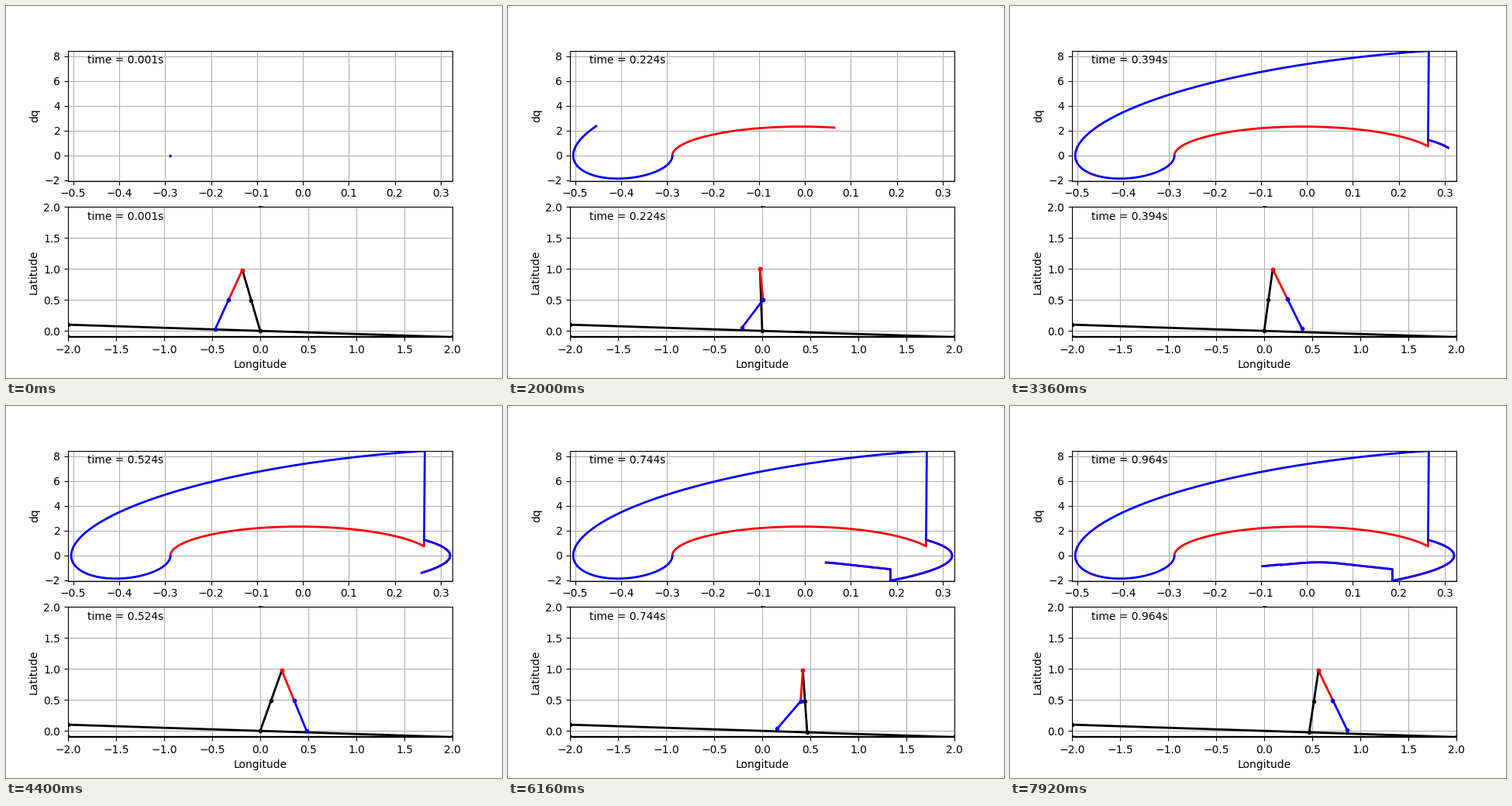
Animation, 640 px wide and 480 px high, one loop 8 s. Source, as a matplotlib script:

```python
import numpy as np
import matplotlib.pyplot as plt
from matplotlib.animation import FuncAnimation

FRAMES, INTERVAL = 100, 80
GRAVITY, SLOPE, STEP = 9.81, np.tan(0.0504), 0.00025

# Kneed passive walker: stance leg angle, swing thigh angle, swing shank angle.
# Each row places one mass: stance shank, stance thigh, hip, swing thigh, swing shank.
ARMS = np.array([[0.375, 0, 0], [0.675, 0, 0], [1, 0, 0],
                 [1, 0.325, 0], [1, 0.5, 0.125]])
MASS = np.tile([0.05, 0.5, 0.5, 0.5, 0.05], 2)
SIGN = np.array([1, -1, -1])
PULL = np.repeat([0, -GRAVITY], 5)
FREE = np.eye(3)
LOCKED = np.array([[1, 0], [0, 1], [0, 1]])


def jacobian(q):
    return np.vstack([ARMS * np.cos(q), -ARMS * SIGN * np.sin(q)])


def project(q, target, joints):
    """Mass-weighted fit of the mass motions to the allowed joint motions."""
    jac = jacobian(q) @ joints
    weighted = jac.T * MASS
    return joints @ np.linalg.solve(weighted @ jac, weighted @ target)


def derivative(state, joints):
    q, dq = state[:3], state[3:]
    bias = np.concatenate([-ARMS @ (np.sin(q) * dq**2),
                           -ARMS @ (SIGN * np.cos(q) * dq**2)])
    return np.concatenate([dq, project(q, PULL - bias, joints)])


def advance(state, joints):
    k1 = derivative(state, joints)
    k2 = derivative(state + STEP / 2 * k1, joints)
    k3 = derivative(state + STEP / 2 * k2, joints)
    k4 = derivative(state + STEP * k3, joints)
    return state + STEP / 6 * (k1 + 2 * k2 + 2 * k3 + k4)


def swing_foot(q):
    return np.array([np.sin(q[0]) + np.sin(q[1:]).mean(),
                     np.cos(q[0]) - np.cos(q[1:]).mean()])


def simulate(duration):
    state = np.array([-0.1877, -0.2884, -0.2884, 1.1014, -0.0399, -0.0399])
    origin, joints, swinging = np.zeros(2), FREE, True
    times, poses, trace = [], [], []

    def record(t):
        q, dq = state[:3], state[3:]
        times.append(t)
        poses.append((*origin, *q))
        trace.append((q[1], q[2], dq[1], dq[2]) if swinging
                     else (-q[0], -q[0], -dq[0], -dq[0]))

    record(0)
    for i in range(1, int(duration / STEP) + 1):
        state = advance(state, joints)
        q, dq = state[:3], state[3:]
        foot = swing_foot(q)
        record(i * STEP)
        if joints is FREE and q[2] >= q[1] and dq[2] > dq[1]:
            # knee strike
            joints = LOCKED
            q = np.array([q[0], q[1], q[1]])
            state = np.concatenate([q, project(q, jacobian(q) @ dq, joints)])
            record(i * STEP)
        elif joints is LOCKED and q[0] > 0 and foot[1] + SLOPE * foot[0] <= 0:
            # heel strike: the legs swap roles
            velocity = (jacobian(q) @ dq).reshape(2, 5)[:, ::-1].ravel()
            q = np.array([-q[1], -q[0], -q[0]])
            state = np.concatenate([q, project(q, velocity, LOCKED)])
            origin, joints, swinging = origin + foot, FREE, not swinging
            record(i * STEP)
    return np.array(times), np.array(poses), np.array(trace)


times, poses, trace = simulate(0.97)

fig, (phase_ax, walk_ax) = plt.subplots(2, 1, figsize=(6.4, 4.8), dpi=100)
phase_ax.set(xlim=(-0.5114, 0.3257), ylim=(-2.04, 8.46), xlabel="q", ylabel="dq")
walk_ax.set(xlim=(-2, 2), ylim=(-0.1, 2), xlabel="Longitude", ylabel="Latitude")
labels = []
for ax in (phase_ax, walk_ax):
    ax.grid()
    labels.append(ax.text(0.05, 0.9, "", transform=ax.transAxes))

thigh_trace, = phase_ax.plot([], [], "r-", lw=2)
shank_trace, = phase_ax.plot([], [], "b-", lw=2)
limb = dict(lw=2, markersize=3)
walk_ax.plot([-2, 2, -2], [0.1, -0.1, -0.1], "ko-", **limb)
stance, = walk_ax.plot([], [], "ko-", **limb)
thigh, = walk_ax.plot([], [], "ro-", **limb)
shank, = walk_ax.plot([], [], "bo-", **limb)


def draw(frame):
    t = max(0.001 * (frame + 1), 0.01 * frame - 0.026)
    end = np.searchsorted(times, t + STEP / 2)
    for label in labels:
        label.set_text(f"time = {t:.3f}s")
    thigh_trace.set_data(trace[:end, 0], trace[:end, 2])
    shank_trace.set_data(trace[:end, 1], trace[:end, 3])

    x, y, lean, upper, lower = poses[end - 1]
    foot = np.array([x, y])
    up = np.array([np.sin(lean), np.cos(lean)])
    hip = foot + up
    knee = hip + 0.5 * np.array([np.sin(upper), -np.cos(upper)])
    toe = knee + 0.5 * np.array([np.sin(lower), -np.cos(lower)])
    stance.set_data(*zip(foot, foot + up / 2, hip))
    thigh.set_data(*zip(hip, knee))
    shank.set_data(*zip(knee, toe))
    return [thigh_trace, shank_trace, stance, thigh, shank, *labels]


anim = FuncAnimation(fig, draw, frames=FRAMES, interval=INTERVAL,
                     init_func=lambda: draw(0), repeat=True, repeat_delay=0)
plt.show()
```
